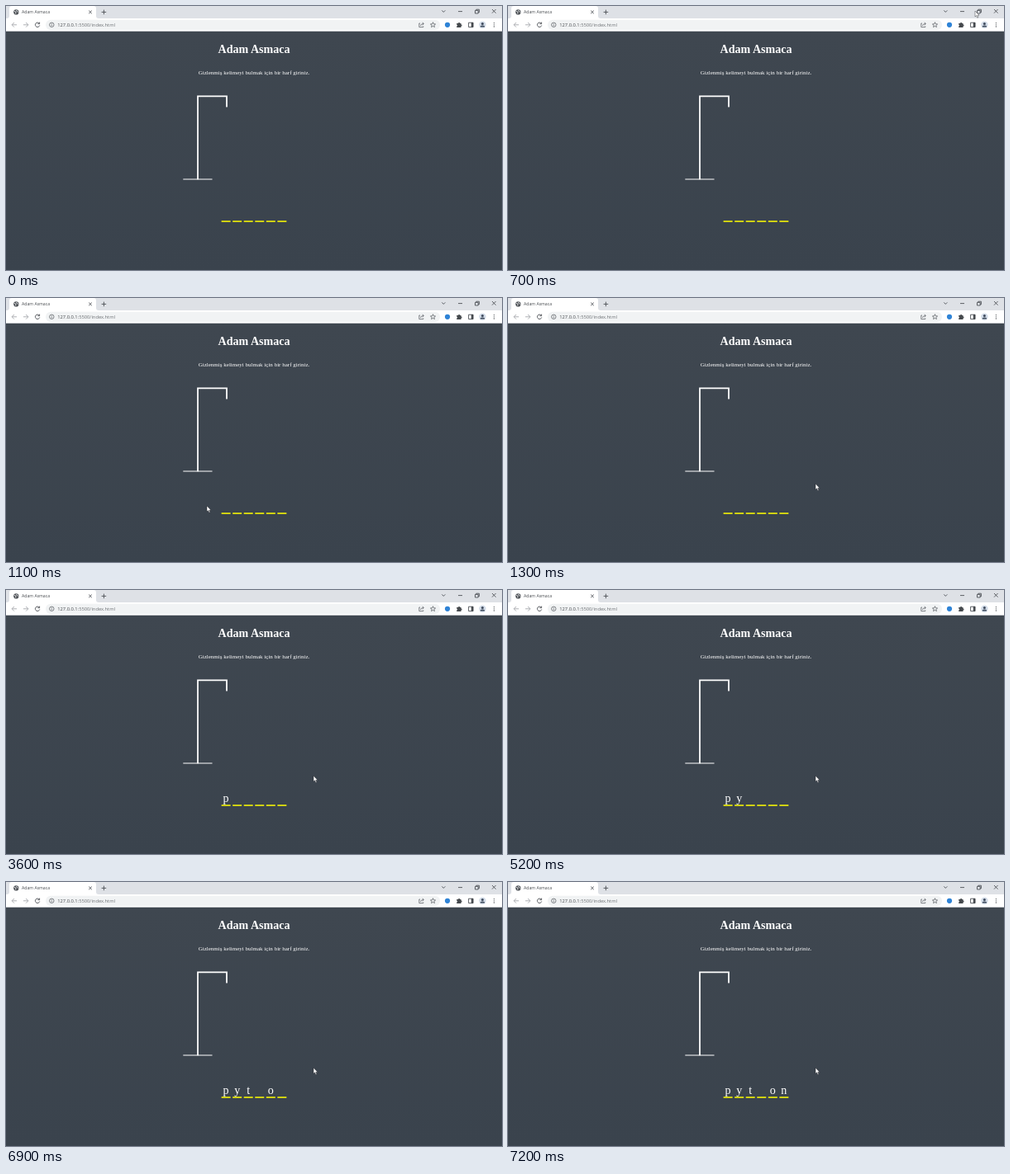
Recreate the animation shown at these times as an HTML page. Size 600x320 px, loop 8 s.

```html
<!DOCTYPE html>
<html lang="tr">
<head>
<meta charset="utf-8">
<title>Adam Asmaca</title>
<style>
html, body { margin: 0; width: 100%; height: 100%; overflow: hidden; }
svg { display: block; width: 600px; height: 320px; }
.ui { font-family: "Open Sans", sans-serif; fill: #45494d; }
.page { font-family: "Liberation Serif", serif; fill: #fff; text-anchor: middle; }
.line { fill: none; stroke: #4d5156; stroke-width: .9; }
</style>
</head>
<body>
<svg viewBox="0 0 600 320">
  <defs>
    <linearGradient id="bg" x2="0" y2="1">
      <stop stop-color="#3f4750"/>
      <stop offset="1" stop-color="#3a434d"/>
    </linearGradient>
  </defs>

  <!-- tab strip -->
  <rect width="600" height="15" fill="#dee1e6"/>
  <path d="M1 15Q4 15 4 12V3Q4 0 7 0H106Q109 0 109 3V12Q109 15 112 15Z" fill="#fff"/>
  <circle cx="12.3" cy="7.4" r="3.1" fill="#4d5156"/>
  <path d="M10 6.2L12 7.3 11.6 9.4M13 4.8L12.8 6.1 14.6 7.4" fill="none" stroke="#fff" stroke-width=".8"/>
  <text class="ui" x="19" y="9.4" font-size="5.15">Adam Asmaca</text>
  <path class="line" d="M100.2 5.6L103.8 9.2M103.8 5.6L100.2 9.2M115.6 7.4H121.2M118.4 4.6V10.2"/>
  <path class="line" d="M527.3 5.4L529.3 7.4 531.3 5.4M547 6.6H552M567.5 5.4H571.2V9H567.5ZM568.8 5.2V4.2H572.4V7.8H571.4M588 4L592.6 8.6M592.6 4L588 8.6"/>

  <!-- toolbar -->
  <rect y="15" width="600" height="15.6" fill="#fff"/>
  <rect y="30" width="600" height=".8" fill="#dadce0"/>
  <rect x="48" y="16.8" width="477" height="12.2" rx="6.1" fill="#f1f3f4"/>
  <path class="line" d="M13 22.8H7.2M9.9 20L7.1 22.8 9.9 25.6M21 22.8H26.8M24.1 20L26.9 22.8 24.1 25.6" style="stroke:#a5a8ac"/>
  <path class="line" d="M40.2 21.1A2.7 2.7 0 1 0 40.7 23.5M40.6 19.6V21.7H38.4"/>
  <circle class="line" cx="55.3" cy="22.8" r="2.7" style="stroke-width:.7"/>
  <path class="line" d="M55.3 21.1V21.8M55.3 22.4V24.4" style="stroke-width:.7"/>
  <text class="ui" x="62.3" y="25" font-size="5.75" fill="#202124">127.0.0.1<tspan fill="#6d7175">:5500/index.html</tspan></text>
  <path class="line" d="M501 21H499.8V25.6H504.8V24.4M501.4 24Q501.7 21.5 505 21.5M503.7 19.8L505.4 21.5 503.7 23.2" style="stroke-width:.7"/>
  <path class="line" d="M516.5 19.7L517.4 21.8 519.6 22 517.9 23.4 518.4 25.6 516.5 24.4 514.6 25.6 515.1 23.4 513.4 22 515.6 21.8Z" style="stroke-width:.7"/>
  <circle cx="534" cy="22.8" r="3.1" fill="#2f83d6"/>
  <path d="M545.2 21H547A1.1 1.1 0 0 1 549.2 21H550.5V22.4A1.1 1.1 0 0 1 550.5 24.6V26H545.2V24.5A1.1 1.1 0 0 0 545.2 22.4Z" fill="#45494d"/>
  <path class="line" d="M559.6 20.2H565V25.6H559.6Z"/>
  <path d="M562.8 20H565.2V25.8H562.8Z" fill="#45494d"/>
  <circle cx="576.4" cy="22.8" r="4.2" fill="#d3dce8"/>
  <g fill="#3e4a5c"><circle cx="576.4" cy="21.4" r="1.5"/><path d="M573.6 25.6Q573.6 23.5 576.4 23.5T579.2 25.6Z"/></g>
  <g fill="#4d5156"><circle cx="590.4" cy="20.6" r=".65"/><circle cx="590.4" cy="22.8" r=".65"/><circle cx="590.4" cy="25" r=".65"/></g>

  <!-- page -->
  <rect y="30.8" width="600" height="289.2" fill="url(#bg)"/>
  <g class="page">
    <text x="300" y="56.6" font-size="14.05" font-weight="bold">Adam Asmaca</text>
    <text x="300" y="83" font-size="7.03">Gizlenmiş kelimeyi bulmak için bir harf giriniz.</text>
    <g id="word" font-size="14.05"></g>
  </g>
  <path d="M232 210.2V109.4H267V122.4" fill="none" stroke="#fff" stroke-width="1.76"/>
  <path d="M214.3 210H249.5" stroke="#fff" stroke-width="1.1"/>
  <path id="cursor" d="M0 0V7L1.6 5.6 2.7 8.2 3.9 7.7 2.8 5.2H5Z" fill="#fff" stroke="#15191d" stroke-width=".4"/>
</svg>
<script>
const LOOP = 8000;
const word = "python";
const reveal = [3600, 5200, 5900, Infinity, 6900, 7200];
// cursor stops, 100 ms apart from 700 ms on
const stops = [[565, 6], [475, 132], [388, 246.2], [300, 255], [243, 252], [312, 238], [372, 225.2]];

const cursor = document.getElementById("cursor");
const group = document.getElementById("word");

function add(tag, attrs) {
  const el = document.createElementNS("http://www.w3.org/2000/svg", tag);
  for (const key in attrs) el.setAttribute(key, attrs[key]);
  return group.appendChild(el);
}

const letters = [...word].map((ch, i) => {
  const x = 266.1 + 13.55 * i;
  add("rect", { x: x - 5.5, y: 260.3, width: 11, height: 1.5, fill: "#ff0" });
  const el = add("text", { x, y: 256.8 });
  el.textContent = ch;
  return el;
});

function draw(t) {
  letters.forEach((el, i) => el.setAttribute("visibility", t >= reveal[i] ? "visible" : "hidden"));
  const step = Math.min(Math.floor((t - 700) / 100), stops.length - 1);
  cursor.setAttribute("visibility", step < 0 ? "hidden" : "visible");
  if (step >= 0) cursor.setAttribute("transform", `translate(${stops[step]})`);
}

const start = performance.now();
function tick() {
  draw((performance.now() - start) % LOOP);
  requestAnimationFrame(tick);
}
tick();
</script>
</body>
</html>
```
